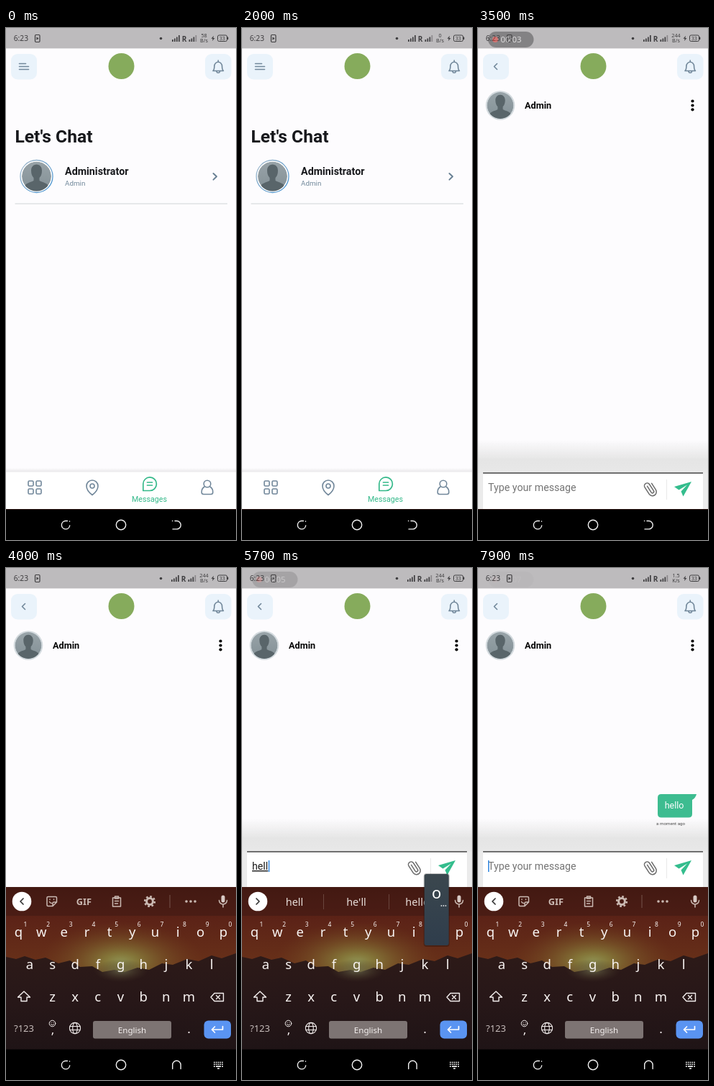
An HTML page for the animation above (8000 ms loop, 320x711 px).

```html
<!DOCTYPE html>
<html lang="en">
<head>
<meta charset="utf-8">
<title>Chat</title>
<style>
html, body { margin: 0; width: 100%; height: 100%; overflow: hidden; background: #fdfcfe; }
svg { display: block; width: 100%; height: 100%; }
text { font-family: Roboto, sans-serif; white-space: pre; }
.sys text, text.sys { font-family: "Noto Sans", sans-serif; }
.mid { text-anchor: middle; }
.line { fill: none; stroke-linecap: round; stroke-linejoin: round; }
.slate { stroke: #71879a; stroke-width: 1.6; }
.green { stroke: #35b98a; stroke-width: 1.7; }
.pale { stroke: #cbbab3; stroke-width: 1.5; }
.white { stroke: #f4efee; stroke-width: 1.4; }

#pill { animation: pulse 1s cubic-bezier(.37, 0, .63, 1) infinite alternate; }
#board { animation: board 8s infinite; }
#bar { animation: bar 8s infinite; }
#hint { animation: hint 8s infinite linear; }
#ripple { animation: ripple 8s infinite linear; }
@keyframes pulse { from { opacity: 0 } to { opacity: 1 } }
@keyframes board {
  0%, 46.25% { transform: translateY(225px); animation-timing-function: ease-out }
  50%, 100% { transform: none }
}
@keyframes bar {
  0%, 57.56% { transform: translateY(618px); animation-timing-function: cubic-bezier(.5, 1, .89, 1) }
  61.81%, 100% { transform: translateY(394px) }
}
@keyframes hint {
  0%, 63.87% { opacity: 1 }
  63.88%, 80% { opacity: 0 }
  82.5%, 100% { opacity: 1 }
}
@keyframes ripple {
  0%, 78.75% { transform: scale(.2); opacity: 0 }
  79.5% { transform: scale(.5); opacity: 1 }
  81.25% { transform: scale(1); opacity: .9 }
  84%, 100% { transform: scale(1); opacity: 0 }
}
</style>
</head>
<body>
<svg viewBox="0 0 320 711" preserveAspectRatio="none">
<defs>
  <linearGradient id="fade" x2="0" y2="1">
    <stop stop-color="#e4e4e4" stop-opacity="0"/><stop offset=".6" stop-color="#e5e5e5"/><stop offset="1" stop-color="#e8e8e8"/>
  </linearGradient>
  <linearGradient id="lift" x2="0" y2="1">
    <stop stop-color="#000" stop-opacity="0"/><stop offset="1" stop-color="#000" stop-opacity=".09"/>
  </linearGradient>
  <linearGradient id="ring" x2="1" y2="1">
    <stop stop-color="#a9bccb"/><stop offset="1" stop-color="#3f8fd0"/>
  </linearGradient>
  <linearGradient id="face" x2="0" y2="1">
    <stop stop-color="#98a3a8"/><stop offset="1" stop-color="#839096"/>
  </linearGradient>
  <linearGradient id="sky" x2="0" y2="1">
    <stop stop-color="#47190f"/><stop offset=".2" stop-color="#5c2317"/><stop offset=".5" stop-color="#693219"/>
  </linearGradient>
  <radialGradient id="sun">
    <stop stop-color="#8f9152"/><stop offset=".2" stop-color="#85793a" stop-opacity=".95"/><stop offset=".5" stop-color="#79592a" stop-opacity=".7"/><stop offset="1" stop-color="#6c391d" stop-opacity="0"/>
  </radialGradient>
  <linearGradient id="hill" x2="0" y2="1">
    <stop stop-color="#2d1a18"/><stop offset=".5" stop-color="#271718"/><stop offset="1" stop-color="#1f1416"/>
  </linearGradient>
  <radialGradient id="haze">
    <stop stop-color="#6f7150" stop-opacity=".75"/><stop offset="1" stop-color="#4a3a28" stop-opacity="0"/>
  </radialGradient>
  <linearGradient id="pop" x2="0" y2="1">
    <stop stop-color="#3b474e"/><stop offset="1" stop-color="#2f3d4c"/>
  </linearGradient>
  <clipPath id="round"><circle r="20.5"/></clipPath>
  <g id="avatar" clip-path="url(#round)">
    <circle r="20.5" fill="url(#face)"/>
    <path fill="#59656a" d="M-7.5-8c0-5 3-8.500 7.500-8.500s7.500 3.500 7.500 8.500c0 5-1.500 8-3.500 10v4c5 3 12 3 13 9v8h-34v-8c1-6 8-6 13-9v-4c-2-2-3.500-5-3.500-10z"/>
  </g>
</defs>

<rect width="320" height="711" fill="#fdfcfe"/>

<!-- contact list -->
<g data-off="2600">
  <rect x="7" y="36" width="36" height="35.500" rx="9" fill="#eaf3fb"/>
  <path class="line slate" d="M18.500 49.500h9M18.500 53.500h13M18.500 57.500h13"/>
  <text x="12.500" y="159" font-size="24.600" font-weight="700" fill="#17181c">Let's Chat</text>
  <circle cx="42.500" cy="206" r="22.500" fill="#fff" stroke="url(#ring)" stroke-width="1.300"/>
  <use href="#avatar" x="42.500" y="206"/>
  <text x="82" y="204" font-size="14.300" font-weight="700" fill="#17181c">Administrator</text>
  <text x="82" y="219" font-size="9.800" fill="#71889b">Admin</text>
  <path class="line" stroke="#6a8195" stroke-width="2" d="M288.500 202l4.500 4.300-4.500 4.300"/>
  <rect x="12.500" y="243" width="295.500" height="2" fill="#e6e8ea"/>
  <rect y="611" width="320" height="6" fill="url(#lift)"/>
  <rect y="616.500" width="320" height="52" fill="#fff"/>
  <g class="line slate">
    <rect x="31" y="629" width="7" height="7" rx="1.500"/><rect x="42" y="629" width="7" height="7" rx="1.500"/>
    <rect x="31" y="640" width="7" height="7" rx="1.500"/><rect x="42" y="640" width="7" height="7" rx="1.500"/>
    <path d="M120 648.500c-4-3-8-7.500-8-12.500a8 8 0 0 1 16 0c0 5-4 9.500-8 12.500z"/><circle cx="120" cy="636" r="3"/>
    <circle cx="280" cy="633" r="4.800"/><path d="M276 637c-3 2-4 5-3.800 8 .1 2 1 2.500 2.800 2.500h10c1.800 0 2.700-.5 2.800-2.500.2-3-.8-6-3.800-8"/>
  </g>
  <path class="line green" d="M190.800 642.500V633a9.300 9.300 0 1 1 9.300 9.500zM196.500 631h7M196.500 635h7"/>
  <text class="mid" x="199.500" y="658" font-size="10.670" fill="#35b98a">Messages</text>
</g>

<!-- conversation -->
<g data-on="2600">
  <rect x="7" y="36" width="36" height="35.500" rx="9" fill="#eaf3fb"/>
  <path class="line slate" d="M26.500 49.500l-4 4 4 4"/>
  <circle cx="31" cy="107.500" r="20.300" fill="#d3dade"/>
  <use href="#avatar" transform="translate(31 107.500) scale(.9)"/>
  <text x="65" y="112" font-size="12.700" font-weight="700" fill="#050505">Admin</text>
  <circle cx="298.500" cy="101.500" r="2.100"/><circle cx="298.500" cy="107.500" r="2.100"/><circle cx="298.500" cy="113.300" r="2.100"/>
  <g data-on="6900">
    <path fill="#3dbc90" d="M255 314h49q-1 5-6 8v19.500q0 5-5 5h-38q-5 0-5-5V319q0-5 5-5z"/>
    <text x="259.700" y="334" font-size="12.440" fill="#fff">hello</text>
    <text x="248" y="357" font-size="6.220" fill="#111">a moment ago</text>
  </g>
  <g id="bar">
    <rect y="-46" width="320" height="46" fill="url(#fade)"/>
    <rect width="320" height="300" fill="#ebebeb"/>
    <rect x="7" width="306" height="300" fill="#fff"/>
    <g transform="translate(285 19)"><circle id="ripple" r="28" fill="#000" fill-opacity=".06"/></g>
    <rect x="263" y="1" width="50" height="39" fill="#fff"/>
    <rect data-off="3300" x="7" y="0" width="306" height="1" fill="#8a8a8a"/>
    <rect data-on="3300" x="7" y="-1" width="306" height="2" fill="#707070"/>
    <text id="hint" x="14" y="25" font-size="14.220" fill="#747474">Type your message</text>
    <text id="typed" x="14" y="25" font-size="14.220" fill="#1c1c1c" text-decoration="underline"></text>
    <rect id="caret" y="12" width="1.500" height="16" fill="#2f86e0"/>
    <path d="M262.500 9v28" stroke="#e9e9e9"/>
    <path class="line" stroke="#6c6c6c" stroke-width="1.400" transform="translate(240 22) rotate(-33) scale(1.1)" d="M5-5V4.500a5 5 0 0 1-10 0V-5.500a3.500 3.500 0 0 1 7 0V4.200a1.800 1.800 0 0 1-3.600 0V-5"/>
    <path fill="#34bd8d" d="M297 12 273 19l6.500 4.500 11.500-7-8.500 9 3 7z"/>
  </g>
</g>

<!-- header -->
<circle cx="160.500" cy="53" r="18" fill="#86ab5c"/>
<rect x="277" y="36" width="36.500" height="35.500" rx="9" fill="#eaf3fb"/>
<path class="line slate" stroke-width="1.400" d="M288 59.500h14.500c-1.700-1.500-1.900-3-1.900-6.500a5.350 5.700 0 0 0-10.700 0c0 3.500-.2 5-1.900 6.500zM295.250 47v-2M293 60.500a2.300 2.300 0 0 0 4.500 0"/>

<!-- status bar -->
<g class="sys" fill="#3f3e40">
  <rect width="320" height="28.400" fill="#bdbbbd"/>
  <text x="10.800" y="18.300" font-size="10.200">6:23</text>
  <rect x="40.500" y="9.500" width="6.500" height="10" rx="1.200" fill="none" stroke="#3f3e40" stroke-width="1.200"/>
  <path d="M42.500 12.200v4.600l3-2.300z"/>
  <circle cx="215.500" cy="14.500" r="1.800"/>
  <g id="signal">
    <path d="M231 16h1.700v3H231zm3-1.500h1.700V19H234zm3-2h1.700V19H237zm3-2.500h1.700v9H240z"/>
    <text x="244.700" y="18.500" font-size="10" font-weight="700">R</text>
    <path d="M254.500 16h1.700v3h-1.700zm3-1.500h1.700V19h-1.700zm3-2h1.700V19h-1.700z"/>
    <path opacity=".4" d="M263.500 10h1.700v9h-1.700z"/>
  </g>
  <text id="speed" class="mid" x="275.500" y="13.300" font-size="7.200"></text>
  <text id="unit" class="mid" x="275.500" y="20.300" font-size="7.200">B/s</text>
  <path d="M289 10.800l-3.500 4h2.200l-.7 3.200 3.500-4h-2.200z"/>
  <rect x="294.500" y="10" width="13" height="8.500" rx="2" fill="none" stroke="#3f3e40"/>
  <rect x="308" y="12.500" width="1.300" height="3.500"/>
  <text class="mid" x="301" y="16.800" font-size="6.800">33</text>
</g>
<g id="pill">
  <rect x="14" y="5" width="63.500" height="22" rx="11" fill="#4a494b"/>
  <circle cx="24" cy="16" r="4" fill="#e8352f"/>
  <text id="timer" class="sys" x="31.500" y="20.200" font-size="11.400" fill="#fff"></text>
</g>

<!-- keyboard -->
<g id="board" class="sys">
  <rect y="443" width="320" height="226" fill="url(#sky)"/>
  <ellipse cx="160" cy="546" rx="115" ry="55" fill="url(#sun)"/>
  <path fill="url(#hill)" d="M0 540l14 3 12-4 15 5 14-3 18 8 16-4 14 9 17-1 14 8 17-3 14 3 18-6 16 3 18-9 15 2 20-8 16 3 18-8 14 4 20-7V669H0z"/>
  <ellipse cx="160" cy="559" rx="38" ry="16" fill="url(#haze)"/>
  <rect y="443" width="320" height="40" fill="#421a14" opacity=".6"/>
  <circle cx="22" cy="463" r="13.300" fill="#fff"/>
  <path id="chevron" class="line" stroke="#333" stroke-width="1.700" d="M2-4l-4 4 4 4"/>
  <g id="tools">
    <g class="line pale">
      <path d="M58.500 456.500h10.500q1.500 0 1.500 1.500v6l-5.500 5.500h-6.500q-1.500 0-1.500-1.500v-10q0-1.500 1.500-1.500zM70 464h-3.500q-1.500 0-1.500 1.500v3.500M61 460v.5M66.500 460v.5M60.500 463.500q1 2 3 2"/>
      <path d="M148.500 458h11v12h-11zM151.500 456h5v3h-5zM151.500 462.500h5M151.500 466h4"/>
      <circle cx="200" cy="463" r="4.400" stroke-width="3"/>
      <circle cx="200" cy="463" r="6.800" stroke-width="2.600" stroke-dasharray="2.670" stroke-linecap="butt"/>
    </g>
    <text class="mid" x="108.500" y="467.500" font-size="12.800" font-weight="800" fill="#cbbab3">GIF</text>
    <path d="M228 454v18" stroke="#76544c"/>
    <g fill="#cbbab3"><circle cx="251" cy="463" r="1.800"/><circle cx="257" cy="463" r="1.800"/><circle cx="263" cy="463" r="1.800"/></g>
  </g>
  <g id="words" fill="#e6dcd8">
    <path d="M113.500 453v21M204.500 453v21" stroke="#69453d"/>
    <text class="mid" x="73" y="468.500" font-size="14.500"></text>
    <text class="mid" x="159" y="468.500" font-size="14.500"></text>
    <text class="mid" x="244" y="468.500" font-size="14.500"></text>
  </g>
  <rect x="299.500" y="454.500" width="5" height="10" rx="2.500" fill="#d8cac5"/>
  <path class="line pale" d="M296.500 461.500a5.500 5.500 0 0 0 11 0M302 467.500v3.500"/>
  <g id="keys" fill="#f8f4f2"></g>
  <g class="line white">
    <path d="M25 588l8.500 8H29v5.500h-8V596h-4.500z"/>
    <path d="M290 590.500h12.500v11H290l-5-5.500zM292.500 593.500l5 5M297.500 593.500l-5 5"/>
    <circle cx="64.500" cy="632.500" r="4.300" stroke-width="1"/><path stroke-width="1" d="M63 631v.2M66 631v.2M62.500 633.800q2 2 4 0"/>
    <circle cx="96" cy="639" r="7.600" stroke-width="1.100"/><ellipse cx="96" cy="639" rx="3.300" ry="7.600" stroke-width="1.100"/>
    <path stroke-width="1.100" d="M89 636.500h14M89 641.500h14"/>
  </g>
  <g fill="#f4efee">
    <text x="11" y="644" font-size="13" fill="#c6bcba">?123</text>
    <text class="mid" x="65" y="646.500" font-size="17">,</text>
    <text class="mid" x="254.500" y="646" font-size="17">.</text>
    <rect x="121" y="629" width="109" height="24.500" rx="3" fill="#7d7473"/>
    <text class="mid" x="175.500" y="645.500" font-size="11.600">English</text>
  </g>
  <rect x="275.500" y="628.500" width="37.500" height="25" rx="6" fill="#5a94f2"/>
  <path class="line" stroke="#fff" stroke-width="1.700" d="M301.500 636.500v4.500h-15M290.500 637l-4 4 4 4"/>
  <g id="popup">
    <rect x="-18" y="-81" width="36" height="102" rx="4" fill="#000" opacity=".25"/>
    <rect x="-17" y="-80" width="34" height="99" rx="3" fill="url(#pop)"/>
    <text class="mid" y="-46" font-size="22" fill="#fff"></text>
    <path d="M6-36h1.500m1.500 0h1.500m1.500 0h1.500" stroke="#fff" stroke-width="1.500"/>
  </g>
</g>

<!-- system navigation -->
<rect y="668.500" width="320" height="42.500" fill="#000"/>
<g class="line" stroke="#f2f2f2" stroke-width="1.400">
  <path d="M85.500 684.500h-3a5.700 5.700 0 1 0 6.200 6.500M88.500 685v.2"/>
  <circle cx="160" cy="690" r="6.700"/>
  <path data-off="3600" d="M235 684.500h2.500a5.700 5.700 0 0 1 0 11.400H232M231.500 684.500h.2"/>
  <path data-on="3600" d="M231.700 695.500V690a5.700 5.700 0 0 1 11.400 0v5.500"/>
  <g data-on="3600" stroke-linecap="butt" stroke-width="1.600">
    <path stroke-dasharray="1.700 1.100" d="M289 686.500h13M289 689.300h13"/><path d="M289 692.100h1.700M292 692.100h7M300.300 692.100h1.700M294 695h3"/>
  </g>
</g>
</svg>
<script>
const LOOP = 8000, SENT = 6400, LAG = 110;
const $ = id => document.getElementById(id);
const show = (el, on) => { el.style.visibility = on ? "inherit" : "hidden"; };
const at = (list, t) => list.filter(item => item[0] <= t).pop();

const rows = [["qwertyuiop", 17.5, 505], ["asdfghjkl", 33, 550], ["zxcvbnm", 64.5, 595]];
const presses = [[5000, "h"], [5170, "e"], [5330, "l"], [5480, "l"], [5660, "o"]];
const speeds = [[0, "58", "B/s"], [300, "0", "B/s"], [3200, "244", "B/s"], [6200, "1.5", "K/s"]];
const guesses = [[], ["h", "hi", "hey"], ["he", "her", "here"], ["hel", "help", "hello"],
  ["hell", "he'll", "hello"], ["hello", "hellos", "Hello"]];

const spots = {};
function addKey(label, x, y, size) {
  const el = document.createElementNS("http://www.w3.org/2000/svg", "text");
  el.setAttribute("class", "mid");
  el.setAttribute("x", x);
  el.setAttribute("y", y);
  el.setAttribute("font-size", size);
  el.textContent = label;
  $("keys").append(el);
}
rows.forEach(([letters, left, y], r) => [...letters].forEach((c, i) => {
  const x = left + 31.65 * i;
  spots[c] = [x, y];
  addKey(c, x, y + 6.5, 18.5);
  if (!r) addKey((i + 1) % 10, x + 9.5, y - 7.5, 8.5);
}));

const timed = [...document.querySelectorAll("[data-on], [data-off]")];
const words = $("words").querySelectorAll("text");
let start;

function draw(now) {
  start ??= now;
  const t = (now - start) % LOOP;
  for (const el of timed) show(el, t >= (el.dataset.on || 0) && t < (el.dataset.off || LOOP));

  const [, speed, unit] = at(speeds, t);
  $("speed").textContent = speed;
  $("unit").textContent = unit;
  $("signal").setAttribute("transform", `translate(${speed.length > 2 ? -1 : 0})`);
  $("timer").textContent = "00:0" + Math.floor(t / 1000);

  const count = presses.filter(([p]) => t >= p + LAG).length;
  const text = t < SENT ? "hello".slice(0, count) : "";
  $("typed").textContent = text;
  $("caret").setAttribute("x", 14 + (text ? $("typed").getComputedTextLength() + .5 : 0));
  show($("caret"), t > 3700 && (text || (t % 1000 >= 500 && (t < SENT || t > 6800))));

  show($("tools"), !text);
  show($("words"), text);
  guesses[text.length].forEach((word, i) => { words[i].textContent = word; });
  $("chevron").setAttribute("transform", `translate(22 463) scale(${text ? -1 : 1} 1)`);

  const press = at(presses, t);
  const held = press && t < press[0] + LAG;
  show($("popup"), held);
  if (held) {
    $("popup").setAttribute("transform", `translate(${spots[press[1]]})`);
    $("popup").querySelector("text").textContent = press[1];
  }
  requestAnimationFrame(draw);
}
requestAnimationFrame(draw);
</script>
</body>
</html>
```
